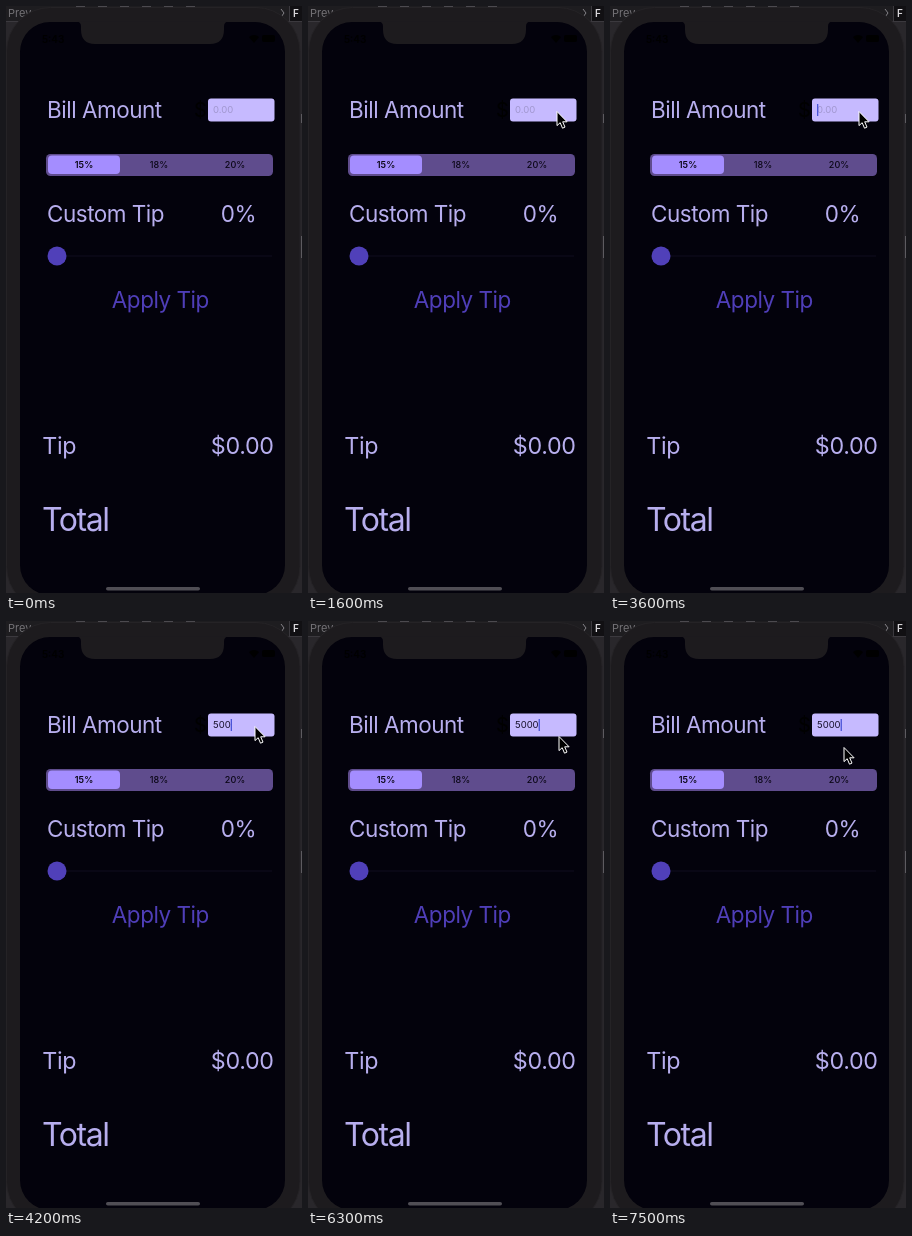
Animation, 296 px wide and 587 px high, one loop 8 s. Source, as an HTML page:

```html
<!DOCTYPE html>
<html lang="en">
<head>
<meta charset="utf-8">
<title>Tip calculator</title>
<style>
  html, body { margin: 0; width: 100%; height: 100%; overflow: hidden; background: #29272b; }
  svg { display: block; font-family: Inter, Roboto, "Liberation Sans", sans-serif; }
  .label { font-size: 22.5px; letter-spacing: -.022em; fill: #b7aeee; }
  .sum { font-size: 23.3px; letter-spacing: -.015em; }
  .total { font-size: 32px; letter-spacing: -.045em; }
  .seg { font-size: 9px; font-weight: 500; text-anchor: middle; fill: #0b0717; }
  .chosen { font-weight: 600; }
  .entry { font-size: 9.5px; }
</style>
</head>
<body>
<svg width="296" height="587" viewBox="0 0 296 587">
  <!-- window behind the phone -->
  <rect width="296" height="587" fill="#29272b"/>
  <rect width="296" height="15" fill="#1e1d20"/>
  <rect x="283" width="13" height="15" fill="#111013"/>
  <path d="M283.5 0V15M0 15.5H296" stroke="#3b393e"/>
  <text x="2" y="11" font-size="11" fill="#737175">Prev</text>
  <path d="M275 3l3 4-3 4" fill="none" stroke="#858388"/>
  <text x="287" y="11" font-size="10" font-weight="600" fill="#d8d6da">F</text>
  <path d="M295.5 108v9M295.5 230v22" stroke="#5d5b60"/>

  <!-- phone -->
  <rect x=".5" y="1.5" width="293.5" height="603" rx="44" fill="#1d1b1e" stroke="#252326"/>
  <path d="M70 .5H190" stroke="#4c4a4f" stroke-dasharray="9 13"/>
  <rect x="14" y="16" width="265" height="573" rx="30" fill="#03020c"/>
  <path d="M70 15.5q5 0 5 5v3q0 14.5 14 14.5h115q14 0 14-14.5v-3q0-5 5-5z" fill="#1d1b1e"/>
  <g>
    <text x="36" y="37" font-size="10" font-weight="600">5:43</text>
    <path d="M243 31q5-4 10 0l-5 6z"/>
    <rect x="256" y="29" width="13" height="7" rx="2"/>
  </g>
  <rect x="100" y="581" width="94" height="3.5" rx="1.75" fill="#504e55"/>

  <!-- form -->
  <g class="label">
    <text x="41" y="112">Bill Amount</text>
    <text x="188" y="111" font-size="20" fill="#000">$</text>
    <text x="41" y="216">Custom Tip</text>
    <text x="232.5" y="216" text-anchor="middle">0%</text>
    <text x="154.3" y="302" text-anchor="middle" fill="#4f3eb8">Apply Tip</text>
    <text class="sum" x="36.3" y="448">Tip</text>
    <text class="sum" x="267.7" y="448" text-anchor="end">$0.00</text>
    <text class="total" x="36" y="525">Total</text>
  </g>
  <rect x="202" y="92.5" width="66.5" height="23" rx="3" fill="#c6baff"/>
  <text id="entry" class="entry" x="207" y="107.4"></text>
  <rect id="caret" y="98" width="1.3" height="12" fill="#4a55d8"/>

  <rect x="40" y="148" width="227" height="22" rx="4.5" fill="#5f4c8d"/>
  <rect x="42" y="149.5" width="72" height="18.5" rx="4" fill="#a48dff"/>
  <text class="seg chosen" x="78" y="162">15%</text>
  <text class="seg" x="153" y="162">18%</text>
  <text class="seg" x="229" y="162">20%</text>

  <path d="M51 250H266" stroke="#0b0918" stroke-width="1.5"/>
  <circle cx="51" cy="250" r="9.5" fill="#5040b9"/>

  <path id="pointer" d="M0 .5V14.6L3.2 11.7 5.5 17.2 8 16.1 5.7 10.8H10.1Z"
        fill="#000" stroke="#fff" stroke-linejoin="round"/>
</svg>
<script>
  const LOOP = 8000;
  const $ = id => document.getElementById(id);
  const entry = $('entry'), caret = $('caret'), pointer = $('pointer');

  // Each track lists [start time, value]; values hold until the next start.
  const moves = [[0, null], [600, [256, 124]], [700, [252, 118]], [1000, [250, 116]],
    [1100, [250, 110]], [1400, [249, 109]], [1500, [249, 107]], [1600, [249, 105]],
    [6000, [251, 115]], [6500, [247, 132]], [6900, [247, 128]], [7300, [234, 126]]];
  const typing = [[0, ''], [3900, '5'], [4100, '50'], [4200, '500'], [5300, '5000']];
  const blink = [[0, 0], [3300, 1], [4800, 0], [5100, 1], [5800, 0], [6300, 1],
    [6900, .15], [7300, .5], [7500, 1]];

  const at = (track, t) => track.findLast(([start]) => start <= t)[1];
  const began = performance.now();

  function draw() {
    const t = (performance.now() - began) % LOOP;
    const pos = at(moves, t), typed = at(typing, t);
    pointer.style.display = pos ? '' : 'none';
    if (pos) pointer.setAttribute('transform', `translate(${pos})`);
    entry.textContent = typed || '0.00';
    entry.setAttribute('fill', typed ? '#17112b' : '#a197cf');
    caret.setAttribute('x', 207 + typed.length * 5.9);
    caret.setAttribute('opacity', at(blink, t));
    requestAnimationFrame(draw);
  }
  draw();
</script>
</body>
</html>
```
